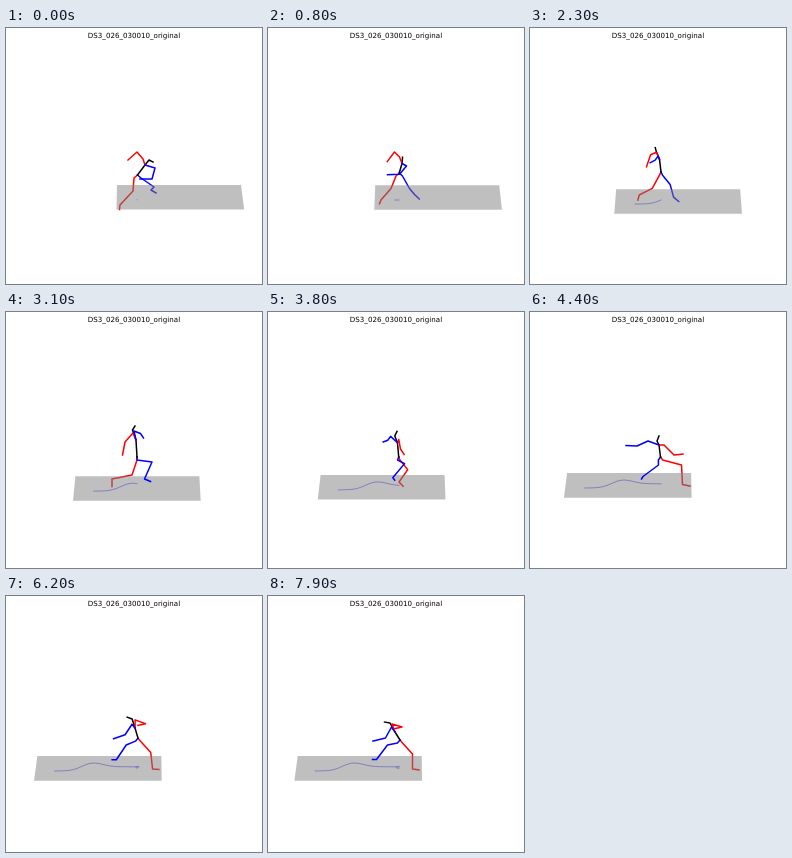
Animation, 256 px wide and 256 px high, one loop 8 s. Source, as an HTML page with a canvas:

```html
<!DOCTYPE html>
<html lang="en">
<head>
<meta charset="utf-8">
<title>Stick figure motion</title>
<style>
html, body { margin: 0; width: 100%; height: 100%; overflow: hidden; background: #fff; }
canvas { display: block; width: 256px; height: 256px; }
</style>
</head>
<body>
<canvas id="stage"></canvas>
<script>
const LOOP = 8, STEP = 0.1;
const RED = '#f00', BLUE = '#00f', BLACK = '#000';
const canvas = document.getElementById('stage');
const ctx = canvas.getContext('2d');
const scale = window.devicePixelRatio || 1;
canvas.width = canvas.height = 256 * scale;

// Key poses as x, y pairs. Spine: pelvis, chest, neck, head.
// Legs: knee, ankle, toe. Arms: shoulder, elbow, wrist.
const poses = [
  { at: 0, spine: [131.5, 147, 139, 137, 143, 132, 147, 134],
    redLeg: [127, 163, 114, 177, 113.5, 181.5], blueLeg: [148, 159, 145, 162, 150, 165],
    redArm: [137, 131, 131, 124, 122, 132], blueArm: [149, 140, 146, 151, 134, 151] },
  { at: 1.6, spine: [131, 143, 129, 134, 126, 128, 122, 124.5],
    redLeg: [119, 158, 112, 167, 109.5, 170], blueLeg: [135, 162, 148, 171, 152.5, 177],
    redArm: [126, 127, 122, 124, 116.5, 135], blueArm: [128, 136, 117, 141.5, 105, 142.5] },
  { at: 3.1, spine: [131, 145, 130, 128, 126.5, 118, 129, 114],
    redLeg: [126, 163, 106, 167, 106, 174.5], blueLeg: [146, 150, 138.5, 167, 144.5, 169.5],
    redArm: [127, 121, 119, 130, 116.5, 143], blueArm: [128, 119, 134.5, 121.5, 137.5, 126] },
  { at: 4.4, spine: [130.5, 145, 129, 133, 127, 129, 129, 124],
    redLeg: [151.5, 153, 152.5, 172.5, 160, 174], blueLeg: [128.5, 153, 113, 164.5, 111.5, 167],
    redArm: [134, 133, 144, 143, 153, 142], blueArm: [118, 129, 107, 134, 96, 133.5] },
  { at: 5.4, spine: [132, 140, 131.5, 128, 131, 118.5, 126.5, 115.5],
    redLeg: [145, 155, 149, 173, 155, 173], blueLeg: [121, 149, 112.5, 164, 108, 164],
    redArm: [135, 119, 146, 124, 140, 125], blueArm: [129, 125, 121, 135, 110.5, 140] },
  { at: 7.9, spine: [132, 144, 127, 136, 122, 127, 116.5, 126],
    redLeg: [144.5, 158, 144.5, 173, 151, 174], blueLeg: [119.5, 149, 108.5, 163.5, 104.5, 163.5],
    redArm: [124, 128, 134, 131, 125, 133], blueArm: [123.5, 131, 117.5, 142, 105, 145] }
];

const clamp = v => Math.max(0, Math.min(1, v));
const smooth = v => { v = clamp(v); return v * v * (3 - 2 * v); };
const bell = v => Math.exp(-v * v);

const STOP = 4.7; // the walk ends here, then the body settles
const walked = t => t * (1.46 + 5.09 * t - 0.334 * t * t);

// Lower left corner of the floor; the camera follows the pelvis
function floorAt(t) {
  const rest = t - STOP;
  return {
    x: rest < 0 ? 110.5 - walked(t) : 26 + 11.5 * rest * Math.exp(-rest / 0.7),
    y: 181.5 + 3.2 * smooth(t / 5) + 5.2 * bell((t - 3.1) / 1.05),
    lean: 0.5 + 0.6 * Math.min(t, STOP)
  };
}

// Blend every joint of two neighbouring poses; the last move eases out
function poseAt(t) {
  let i = 0;
  while (i < poses.length - 2 && t >= poses[i + 1].at) i++;
  const a = poses[i], b = poses[i + 1];
  let k = clamp((t - a.at) / (b.at - a.at));
  if (i === poses.length - 2) k = 1 - (1 - k) ** 2;
  const mix = part => a[part].map((v, j) => v + (b[part][j] - v) * k);
  const spine = mix('spine');
  const [px, py, cx, cy] = spine;
  const turn = 3.5 * Math.cos(Math.PI * Math.min(t, STOP) / 6.2);
  return {
    spine,
    redLeg: [px, py, px - turn, py + 3, ...mix('redLeg')],
    blueLeg: [px, py, px + turn, py + 3, ...mix('blueLeg')],
    redArm: [cx, cy, ...mix('redArm')],
    blueArm: [cx, cy, ...mix('blueArm')]
  };
}

function trace(p) {
  ctx.beginPath();
  for (let i = 0; i < p.length; i += 2) ctx.lineTo(p[i], p[i + 1]);
}

function line(p, color, width = 1.5) {
  trace(p);
  ctx.strokeStyle = color;
  ctx.lineWidth = width;
  ctx.stroke();
}

// The pelvis path projected on the floor
function drawTrail(floor, t) {
  const p = [];
  for (let s = 0; s <= t + 0.01; s += STEP) {
    const u = 131 - floorAt(s).x;
    const v = -9.7 - 4.2 / (1 + Math.exp((46 - u) / 5)) - 4 * bell((u - 59) / 14)
      + 1.5 * smooth(s - 5);
    p.push(floor.x + u, floor.y + v);
  }
  line(p, BLUE, 0.5);
}

function drawFloor({ x, y, lean }) {
  const top = y - 24.6;
  trace([x, y, x + lean, top, x + lean + 124, top, x + 127.7, y]);
  ctx.fillStyle = 'rgba(128,128,128,.5)';
  ctx.fill();
}

function draw(t) {
  ctx.setTransform(scale, 0, 0, scale, 0, 0);
  ctx.fillStyle = '#fff';
  ctx.fillRect(0, 0, 256, 256);
  ctx.lineJoin = 'round';
  ctx.lineCap = 'square';

  const floor = floorAt(t), pose = poseAt(t);
  const blueBelow = t < 2.4;
  drawTrail(floor, t);
  line(pose.redLeg, RED);
  if (blueBelow) line(pose.blueLeg, BLUE);
  drawFloor(floor);
  if (!blueBelow) line(pose.blueLeg, BLUE);
  line(pose.spine, BLACK);
  line(pose.redArm, RED);
  line(pose.blueArm, BLUE);

  ctx.fillStyle = BLACK;
  ctx.font = '7.1px "DejaVu Sans", sans-serif';
  ctx.textAlign = 'center';
  ctx.fillText('DS3_026_030010_original', 128, 10.4);
}

const start = performance.now();
function tick() {
  const t = (performance.now() - start) / 1000 % LOOP;
  draw(Math.floor(t / STEP) * STEP);
  requestAnimationFrame(tick);
}
tick();
</script>
</body>
</html>
```
